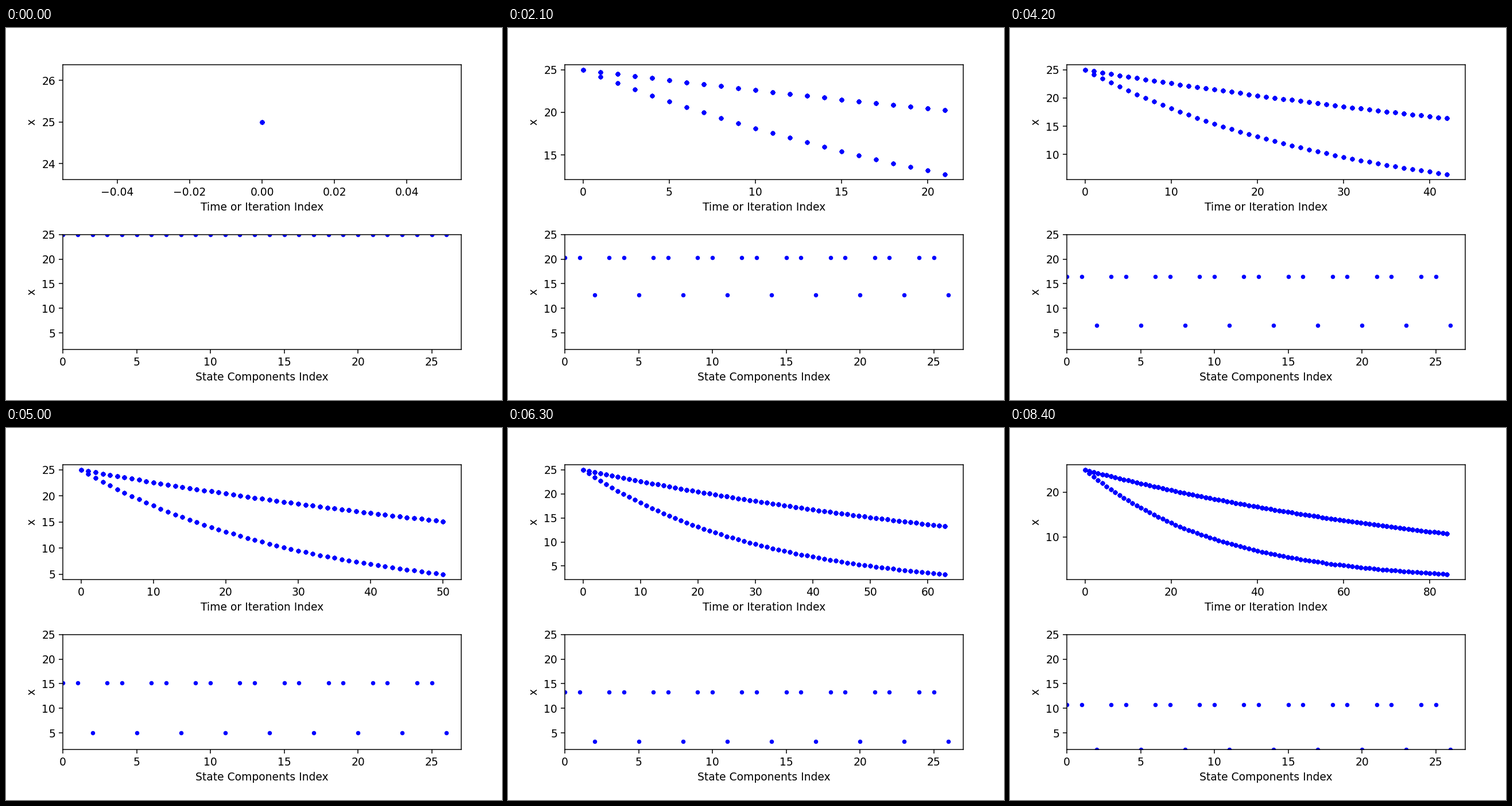
A matplotlib script for the animation above (8.5 s loop, 864 by 648 pixels).

```python
import numpy as np
import matplotlib.pyplot as plt
from matplotlib.animation import FuncAnimation

STEPS, DIM, DT, START = 85, 27, 0.01, 25.0

# Every third component decays faster; explicit Euler steps.
rates = np.where(np.arange(DIM) % 3 == 2, np.sqrt(10), 1.0)
times = np.arange(STEPS)
states = START * (1 - DT * rates) ** times[:, None]

fig, (ax_time, ax_state) = plt.subplots(2, 1, figsize=(6.4, 4.8), dpi=135)
fig.tight_layout(pad=3.0)

ax_state.set_xlim(0, DIM)
ax_state.set_ylim(states.min(), states.max())
ax_state.set_xlabel("State Components Index")
ax_state.set_ylabel("x")
dots, = ax_state.plot(np.arange(DIM), states[0], "b.")


def update(i):
    ax_time.clear()
    ax_time.plot(times[:i + 1], states[:i + 1], "b.")
    ax_time.set_xlabel("Time or Iteration Index")
    ax_time.set_ylabel("x")
    dots.set_ydata(states[i])


anim = FuncAnimation(fig, update, frames=STEPS, init_func=lambda: update(0),
                     interval=100, repeat=True, repeat_delay=0)
plt.show()
```
